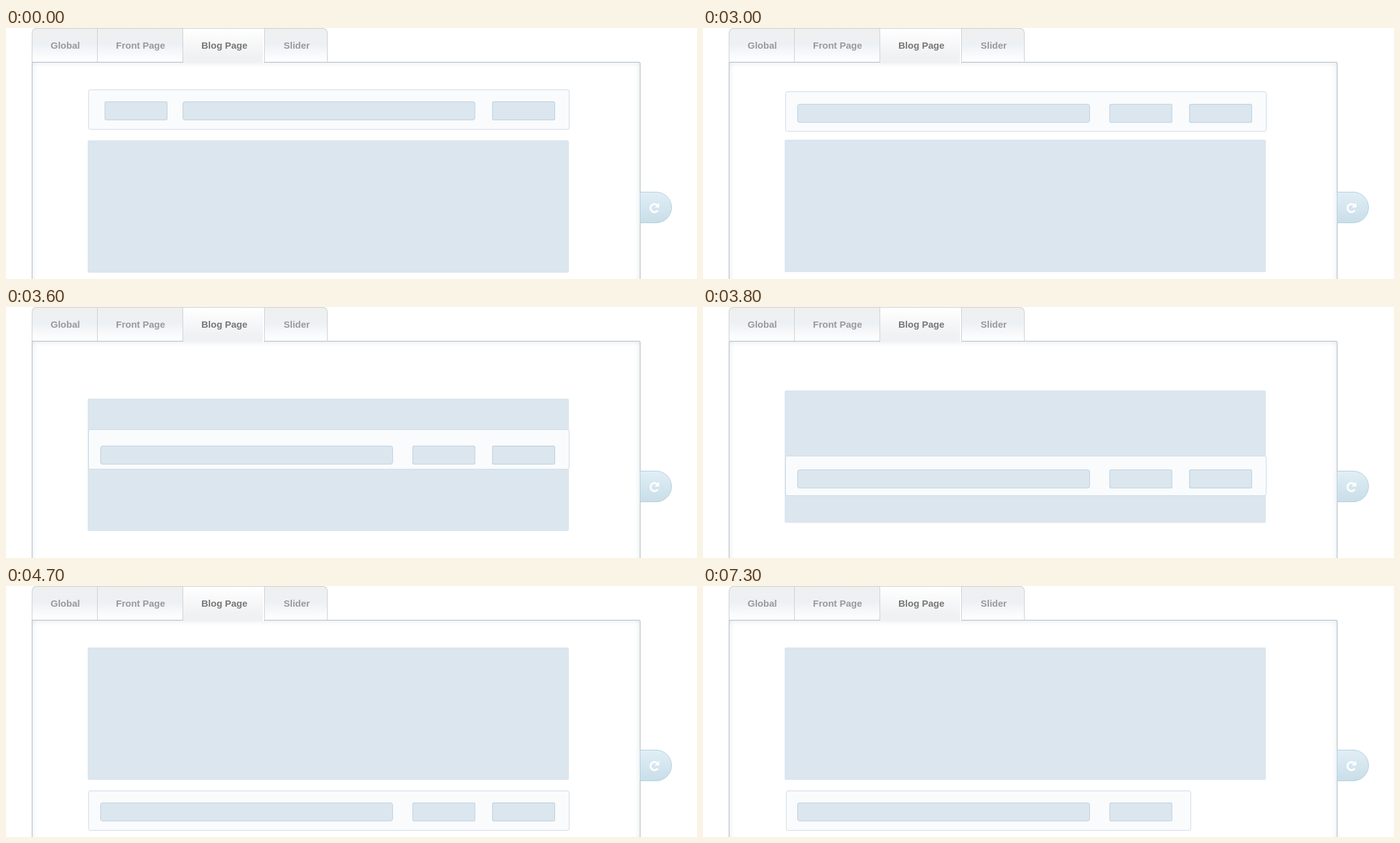
Animation, 1100 px wide and 400 px high, one loop 8.7 s. Source, as an HTML page:

```html
<!DOCTYPE html>
<html lang="en">
<head>
<meta charset="utf-8">
<title>Layout options</title>
<style>
  html, body { margin: 0; width: 100%; height: 100%; overflow: hidden; background: #fff; }
  #stage { position: relative; width: 1100px; height: 400px; overflow: hidden; }
  #stage * { position: absolute; box-sizing: border-box; }

  .sheet {
    left: 41px; top: 54px; width: 969px; height: 380px;
    border: 1px solid #afbac3; border-radius: 2px;
    box-shadow: inset 0 0 10px #dfe5ea;
  }
  .tabs {
    left: 41px; top: 0; width: 471px; height: 55px; overflow: hidden;
    border: 1px solid #cdcfd1; border-bottom: 1px solid #afbac3;
    border-radius: 8px 8px 0 0;
    background: linear-gradient(#efefef, #edf1f4 45%, #fff);
  }
  .tab {
    top: 0; height: 54px; padding-left: 29px; line-height: 54px;
    font: bold 15px/54px "Liberation Sans", Arial, sans-serif;
    color: #999; white-space: nowrap; border-right: 1px solid #cdcfd1;
  }
  .tab:last-child { border: 0; }
  .active {
    left: 282px; top: 1px; width: 130px; height: 55px; line-height: 53px;
    color: #777; background: linear-gradient(#fff, #f0f1f3 80%);
    box-shadow: inset -2px 0 1px #fff;
  }
  .reset {
    left: 1009px; top: 261px; width: 51px; height: 50px;
    border: 1px solid #b2cedd; border-radius: 0 25px 25px 0;
    background: linear-gradient(#e1eef6, #c9dee8);
  }
  .reset svg { left: 13px; top: 15px; }

  #block { left: 130px; width: 766px; height: 211px; border-radius: 2px; background: #dbe6ee; }
  #row { height: 64px; border: 1px solid #d1dae5; border-radius: 3px; background: #f9fbfd; }
  .item { height: 30px; width: 100px; border: 1px solid #bfd2de; border-radius: 2px; background: #dbe6ee; }
  #bar { width: 466px; border-radius: 4px; }
  #end { left: 774px; border-color: #b7cfdc; }
</style>
</head>
<body>
<div id="stage">
  <div class="sheet"></div>
  <div class="tabs">
    <div class="tab" style="left:0;width:104px">Global</div>
    <div class="tab" style="left:104px;width:136px">Front Page</div>
    <div class="tab" style="left:371px;width:98px">Slider</div>
  </div>
  <div class="tab active">Blog Page</div>
  <div class="reset">
    <svg width="20" height="20" viewBox="0 0 20 20">
      <path d="M14 5.6A6.4 6.4 0 1 0 14.6 13.6" fill="none" stroke="#fff" stroke-width="3"/>
      <path d="M17 1.5V9H9.5Z" fill="#fff"/>
    </svg>
  </div>
  <div id="block"></div>
  <div id="row"></div>
  <div id="bar" class="item"></div>
  <div id="small" class="item"></div>
  <div id="end" class="item"></div>
</div>
<script>
  const LOOP = 8700, TICK = 100;
  const [block, row, bar, small, end] =
    ['block', 'row', 'bar', 'small', 'end'].map(id => document.getElementById(id));

  // Smooth curve through [tick, value] points, at rest on both ends
  function curve(points) {
    const rate = points.slice(1).map(([x, y], i) => (y - points[i][1]) / (x - points[i][0]));
    const slope = points.map((_, i) => {
      const a = rate[i - 1], b = rate[i];
      return a * b > 0 ? (a + b) / 2 : 0;
    });
    const last = points.length - 1;
    return x => {
      if (x <= points[0][0]) return points[0][1];
      if (x >= points[last][0]) return points[last][1];
      const i = points.findIndex(p => p[0] > x) - 1;
      const [x0, y0] = points[i], [x1, y1] = points[i + 1];
      const w = x1 - x0, u = (x - x0) / w, v = 1 - u;
      return Math.round(y0 * v * v * (1 + 2 * u) + y1 * u * u * (3 - 2 * u)
        + w * u * v * (slope[i] * v - slope[i + 1] * u));
    };
  }

  const smallX = curve([[0, 157], [4, 250], [8, 451], [12, 568], [16, 647]]);
  const barX = curve([[0, 281], [3, 293], [6, 272], [9, 225], [12, 180], [16, 150]]);
  const rowY = curve([[29, 98], [33, 132], [38, 237], [42, 286], [47, 326]]);
  const itemY = curve([[29, 117], [33, 162], [38, 259], [42, 307], [47, 345]]);
  const blockY = curve([[29, 179], [33, 165], [38, 133], [42, 113], [47, 98]]);

  const px = (el, key, value) => { el.style[key] = value + 'px'; };

  function draw(now) {
    const k = Math.floor(now % LOOP / TICK);
    const shrink = Math.min(Math.max((k - 69) / 4, 0), 1);
    px(small, 'left', smallX(k));
    px(bar, 'left', barX(k));
    for (const el of [small, bar, end]) px(el, 'top', itemY(k));
    px(block, 'top', blockY(k));
    px(row, 'top', rowY(k));
    px(row, 'left', shrink < 1 ? 131 : 132);
    px(row, 'width', Math.round(766 - 121 * shrink));
    end.style.visibility = k < 62 || (k >= 64 && k < 66) ? 'visible' : 'hidden';
  }

  const start = performance.now();
  function loop() {
    draw(performance.now() - start);
    requestAnimationFrame(loop);
  }
  loop();
</script>
</body>
</html>
```
